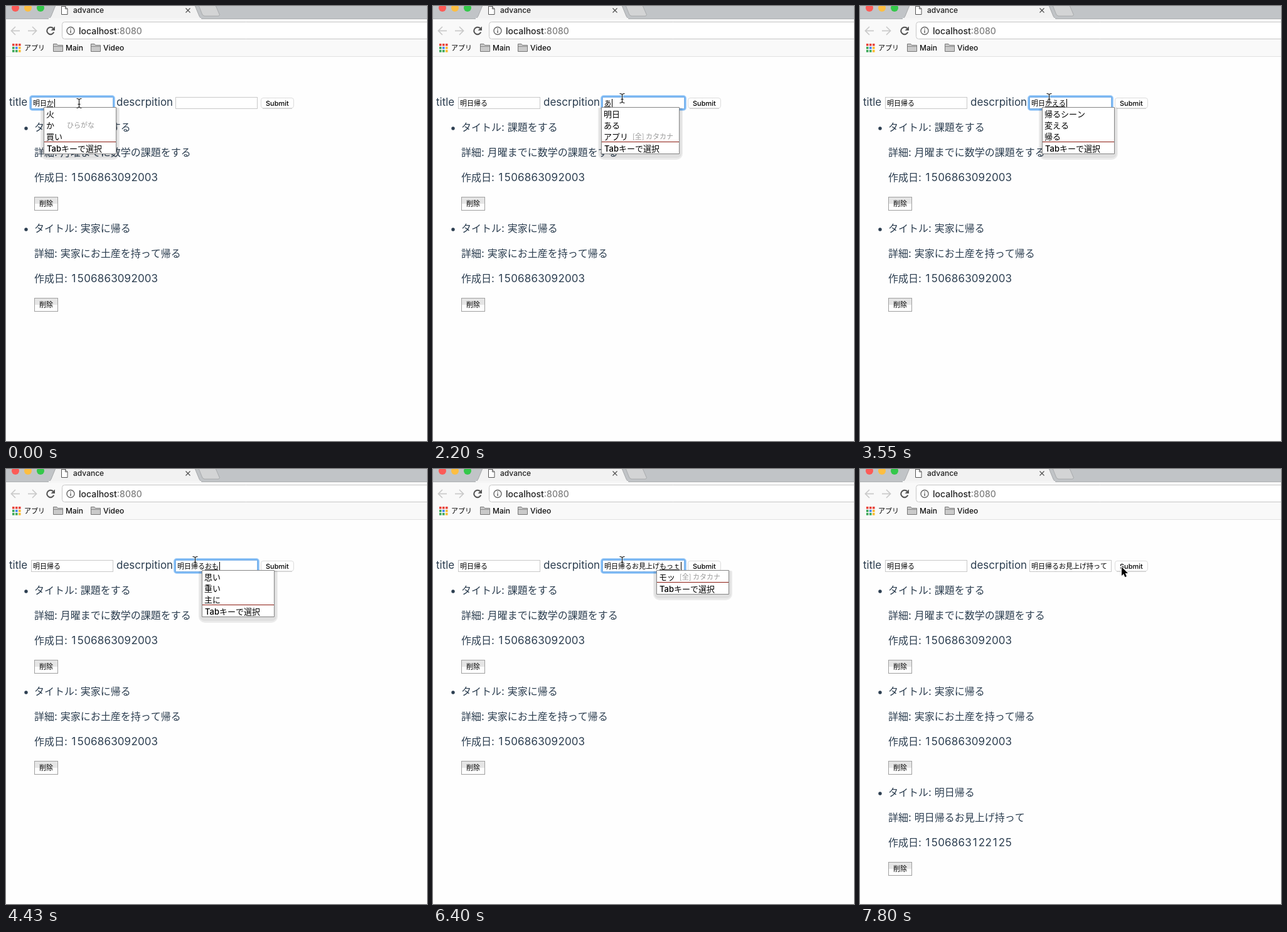
An HTML page with a canvas that plays this animation: 671x693 px, repeating every 8000 ms.

```html
<!DOCTYPE html>
<html lang="ja">
<head>
<meta charset="utf-8">
<title>advance</title>
<style>
  html, body { margin: 0; width: 100%; height: 100%; overflow: hidden; background: #fefefe; }
  canvas { display: block; }
</style>
</head>
<body>
<canvas id="stage" width="671" height="693"></canvas>
<script>
const ctx = document.getElementById('stage').getContext('2d');
const LOOP = 8000;
const LATIN = 'Inter, "Noto Sans CJK JP", "Noto Sans CJK", sans-serif';
const KANA = '"Noto Sans CJK JP", "Noto Sans CJK", Inter, sans-serif';
const INK = '#2c3e50';
const TITLE_X = 40, DESC_X = 270;

// Typing steps: start time, focused field, committed text, composing text, candidates
const KA = ['火', 'か|ひらがな', '買い'];
const KAE = ['変える', '帰る', 'かえ|ひらがな'];
const KAERU = ['帰るシーン', '変える', '帰る'];
const ASHI = ['明日', '足', 'アシスタント|[全] カタカナ'];
const O = ['お', '終わり', '多い'];
const GO_HOME = '明日帰る', GIFT = '明日帰るお見上げ', DONE = '明日帰るお見上げ持って';
const STEPS = [
  [0, 'title', '明日', 'か', KA],
  [180, 'title', '明日', 'かえ', KAE],
  [260, 'title', '明日', 'かえる', KAERU],
  [440, 'title', '明日', '帰る'],
  [860, 'title', GO_HOME],
  [1790, 'desc', ''],
  [2200, 'desc', '', 'あ', ['明日', 'ある', 'アプリ|[全] カタカナ']],
  [2280, 'desc', '', 'あｓ', ASHI],
  [2360, 'desc', '', 'あし', ASHI],
  [2440, 'desc', '', 'あしｔ', ASHI],
  [2530, 'desc', '', 'あした', ['明日', '明日の', 'あした|ひらがな']],
  [2610, 'desc', '', '明日'],
  [3080, 'desc', '明日', 'か', KA],
  [3260, 'desc', '明日', 'かえ', KAE],
  [3370, 'desc', '明日', 'かえｒ', KAE],
  [3550, 'desc', '明日', 'かえる', KAERU],
  [3960, 'desc', '明日', '帰る'],
  [4140, 'desc', GO_HOME, 'お', O],
  [4240, 'desc', GO_HOME, 'おｍ', O],
  [4430, 'desc', GO_HOME, 'おも', ['思い', '重い', '主に']],
  [5210, 'desc', GO_HOME, 'お', O],
  [5380, 'desc', GO_HOME, 'おｍ', O],
  [5440, 'desc', GO_HOME, 'おみ', ['お見']],
  [5620, 'desc', GO_HOME, 'おみあ', ['お見合い', 'お見上げ', 'おみあ']],
  [5800, 'desc', GO_HOME, 'おみあｇ', ['お見上げ']],
  [5900, 'desc', GO_HOME, 'おみあげ', ['お見上げ']],
  [6010, 'desc', GO_HOME, 'お見上げ'],
  [6110, 'desc', GIFT, 'も', ['もう', '持って', 'モニター|[全] カタカナ']],
  [6220, 'desc', GIFT, 'もっ', ['持って', 'もっと', 'モニター|[全] カタカナ']],
  [6400, 'desc', GIFT, 'もっｔ', ['モッ|[全] カタカナ']],
  [6520, 'desc', GIFT, 'もって', ['持って', 'もって', '以って']],
  [6630, 'desc', GIFT, '持って'],
  [6750, 'desc', DONE],
  [7740, '', DONE]
];

const ITEMS = [
  ['課題をする', '月曜までに数学の課題をする', '1506863092003'],
  ['実家に帰る', '実家にお土産を持って帰る', '1506863092003'],
  ['明日帰る', '明日帰るお見上げ持って', '1506863122125']
];

function text(str, x, y, size, color = '#000', family = KANA) {
  ctx.font = `${size < 16 ? 500 : 400} ${size}px ${family}`;
  ctx.fillStyle = color;
  ctx.fillText(str, x, y);
  return ctx.measureText(str).width;
}

// Every digit takes the width of a zero, so numbers line up
function figures(str, x, y, size, color) {
  ctx.font = `${size}px ${LATIN}`;
  ctx.fillStyle = color;
  const cell = ctx.measureText('0').width;
  [...str].forEach((digit, i) =>
    ctx.fillText(digit, x + i * cell + (cell - ctx.measureText(digit).width) / 2, y));
  return cell * str.length;
}

// Latin runs use a slightly larger face than the kana around them
function mixed(str, x, y) {
  for (const run of str.match(/\d+|[ -\/:-~]+|[^ -~]+/g)) {
    if (/\d/.test(run)) x += figures(run, x, y, 17, INK);
    else if (/[ -~]/.test(run)) x += text(run, x, y, 17, INK, LATIN);
    else x += text(run, x, y, 16, INK);
  }
}

function rect(x, y, w, h, fill) {
  ctx.fillStyle = fill;
  ctx.fillRect(x, y, w, h);
}

function box(x, y, w, h, r, fill, stroke, width = 1) {
  ctx.beginPath();
  ctx.roundRect(x, y, w, h, r);
  paint(fill, stroke, width);
}

function poly(points, fill, stroke, width = 1, closed = true) {
  ctx.beginPath();
  points.forEach(([x, y]) => ctx.lineTo(x, y));
  if (closed) ctx.closePath();
  paint(fill, stroke, width);
}

function disc(x, y, r, fill, stroke, width) {
  ctx.beginPath();
  ctx.arc(x, y, r, 0, Math.PI * 2);
  paint(fill, stroke, width);
}

function paint(fill, stroke, width = 1) {
  if (fill) { ctx.fillStyle = fill; ctx.fill(); }
  if (stroke) { ctx.strokeStyle = stroke; ctx.lineWidth = width; ctx.stroke(); }
}

function drawTabs() {
  rect(0, 0, 671, 20, '#c1c4c7');
  rect(0, 20, 671, 1, '#adb0b2');
  ['#fc5b57', '#fdbe41', '#34c84a'].forEach((c, i) => disc(15 + i * 20, 3, 6, c));
  ctx.beginPath();
  ctx.moveTo(67, 21);
  ctx.quadraticCurveTo(70, 20, 72, 16);
  ctx.lineTo(79, -1);
  ctx.lineTo(301, -1);
  ctx.lineTo(308, 16);
  ctx.quadraticCurveTo(310, 20, 313, 21);
  paint('#f2f2f2', '#a6a8aa');
  poly([[307, -1], [334, -1], [340.5, 14], [339, 16], [316, 16], [313, 14]], '#d3d4d5', '#a9abad');
  poly([[88.5, 0.5], [94.5, 0.5], [98, 4.5], [98, 13.5], [88.5, 13.5]], '#fff', '#555');
  poly([[94.5, 0.5], [94.5, 4.5], [98, 4.5]], null, '#555', 1, false);
  text('advance', 107, 11, 12, '#222', LATIN);
  poly([[286.5, 3.5], [293.5, 10.5]], null, '#555', 1.3, false);
  poly([[293.5, 3.5], [286.5, 10.5]], null, '#555', 1.3, false);
}

function drawToolbar() {
  rect(0, 21, 671, 59, '#f9f9f9');
  rect(68, 19, 243, 3, '#f5f5f5');
  rect(0, 80, 671, 1, '#e2e2e2');
  for (const [x, d] of [[15, 1], [42, -1]]) {
    poly([[x - 6 * d, 39.5], [x + 7 * d, 39.5]], null, '#c9c9c9', 1.7, false);
    poly([[x, 33], [x - 6.5 * d, 39.5], [x, 46]], null, '#c9c9c9', 1.7, false);
  }
  ctx.beginPath();
  ctx.arc(71, 39.5, 5.7, 0.4, Math.PI * 1.75);
  paint(null, '#555', 2);
  poly([[78, 32.5], [78, 39], [71.5, 39]], '#555');

  box(89.5, 25.5, 600, 27, 4, '#fff', '#c6c6c6');
  disc(103, 39.5, 6, null, '#666', 1.4);
  rect(102.3, 38.5, 1.5, 4.5, '#666');
  rect(102.3, 35.8, 1.5, 1.5, '#666');
  const w = text('localhost', 116, 44.5, 14, '#222', LATIN);
  text(':8080', 116 + w, 44.5, 14, '#808080', LATIN);

  const red = '#e8453c', green = '#3aa757', blue = '#4285f4', yellow = '#f9bb2d';
  [red, red, red, green, blue, yellow, green, green, yellow].forEach((c, i) =>
    rect(10 + i % 3 * 5, 60 + Math.floor(i / 3) * 5, 3.6, 3.6, c));
  text('アプリ', 29, 71, 11);
  for (const [x, name] of [[75, 'Main'], [135, 'Video']]) {
    poly([[x + .5, 60.5], [x + 6, 60.5], [x + 7.5, 62.5], [x + 15.5, 62.5], [x + 15.5, 72.5], [x + .5, 72.5]],
      '#cacaca', '#777');
    rect(x + 1, 64, 14, 1, '#8b8b8b');
    text(name, x + 20, 71, 12, '#111', LATIN);
  }
}

function drawItem([title, detail, created], top) {
  disc(32, top + 2, 2.7, INK);
  mixed('タイトル: ' + title, 45, top + 6);
  mixed('詳細: ' + detail, 45, top + 46);
  mixed('作成日: ' + created, 45, top + 86);
  rect(45, top + 111, 38, 22, '#a0a0a0');
  rect(46, top + 112, 36, 20, '#fdfdfd');
  rect(46, top + 112, 36, 10, '#e5e5e5');
  text('削除', 53, top + 126, 11);
}

function drawInput(x, value, focused) {
  if (focused) {
    box(x - 1, 144, 133, 21, 3, null, '#a8d0f8', 4);
    box(x - .5, 144.5, 132, 20, 2, null, '#6cb0f2', 2);
  }
  rect(x, 145, 131, 19, focused ? '#8ab9ea' : '#c9c9c9');
  rect(x + 1, 146, 129, 17, '#fff');
  text(value, x + 3, 159, 11);
}

function drawPopup(x, rows) {
  const pairs = rows.map(row => row.split('|'));
  const wordWidth = Math.max(...pairs.map(([word]) => word.length * 13));
  const hasNote = pairs.some(([, note]) => note);
  ctx.font = `11px ${KANA}`;
  const noteWidth = Math.max(...pairs.map(([, note]) => note ? ctx.measureText(note).width : 0));
  const w = Math.max(115, Math.round(5 + wordWidth + (hasNote ? 6 + noteWidth + 9 : 5)));
  const line = 162 + rows.length * 18;
  const h = line + 20 - 161;

  box(x - 5, 162, w + 11, h + 8, [2, 2, 10, 10], 'rgba(0,0,0,.075)');
  box(x - 3, 162, w + 7, h + 5, [2, 2, 7, 7], 'rgba(0,0,0,.05)');
  box(x + .5, 161.5, w, h - 1, 0, '#fff', '#858585');
  pairs.forEach(([word, note], i) => {
    const y = 177 + i * 18;
    text(word, x + 4, y, 13);
    if (note) text(note, x + 11 + wordWidth, y - 1, 11, '#999');
  });
  rect(x + 1, line, w - 1, 1, '#8b1a10');
  const tab = text('Tab', x + 5, line + 16, 13, '#000', LATIN);
  text('キーで選択', x + 5 + tab, line + 16, 13);
}

function drawBeam(x, y) {
  const shape = () => {
    ctx.beginPath();
    ctx.moveTo(x - 3.5, y - 7.5);
    ctx.quadraticCurveTo(x + .5, y - 7.5, x + .5, y - 5);
    ctx.quadraticCurveTo(x + .5, y - 7.5, x + 4.5, y - 7.5);
    ctx.moveTo(x + .5, y - 6);
    ctx.lineTo(x + .5, y + 6);
    ctx.moveTo(x - 3.5, y + 7.5);
    ctx.quadraticCurveTo(x + .5, y + 7.5, x + .5, y + 5);
    ctx.quadraticCurveTo(x + .5, y + 7.5, x + 4.5, y + 7.5);
    ctx.moveTo(x - 1.5, y + 1.5);
    ctx.lineTo(x + 2.5, y + 1.5);
  };
  shape();
  paint(null, 'rgba(255,255,255,.7)', 2.5);
  shape();
  paint(null, '#111', 1.1);
}

function drawArrow(x, y) {
  const tip = [[0, 0], [0, 14], [3.2, 11], [5.4, 16.2], [7.9, 15.1], [5.7, 10], [10, 10]];
  const points = tip.map(([dx, dy]) => [x + dx, y + dy]);
  poly(points, '#000', '#fff', 2);
  poly(points, '#000');
}

function glide(t, start, end, count, from, bend, to) {
  const step = Math.min(count, Math.floor((t - start) / (end - start) * (count - 1) + 1e-6) + 1);
  const p = step / count, u = p * p * (3 - 2 * p), v = 1 - u;
  return from.map((a, i) => v * v * a + 2 * v * u * bend[i] + u * u * to[i]);
}

function drawPointer(t) {
  const title = [116, 155], desc = [301, 147], submit = [417, 156];
  let [x, y] = title;
  if (t >= 6980) [x, y] = glide(t, 6980, 7560, 11, desc, [359, 94], submit);
  else if (t >= 1160) [x, y] = glide(t, 1160, 1560, 8, title, [208, 176], desc);
  const overText = t < 6980 || (y > 144 && x < 402);
  (overText ? drawBeam : drawArrow)(Math.round(x), Math.round(y));
}

function draw(t) {
  const [since, field, fixed, composing = '', rows] = STEPS.findLast(step => step[0] <= t);
  const value = fixed + composing;
  const inTitle = field === 'title';

  rect(0, 0, 671, 693, '#fefefe');
  drawTabs();
  drawToolbar();
  mixed('title', 5, 159);
  mixed('descrpition', 176, 159);
  drawInput(TITLE_X, inTitle ? value : GO_HOME, inTitle);
  drawInput(DESC_X, inTitle ? '' : value, field === 'desc');
  box(406.5, 146.5, 52, 16, 3.5, '#fff', '#dcdcdc');
  rect(409, 163, 47, 1, '#d2d2d2');
  text('Submit', 414, 159, 11, '#000', LATIN);
  ITEMS.slice(0, t >= 7800 ? 3 : 2).forEach((item, i) => drawItem(item, 193 + i * 161));

  if (field) {
    const left = (inTitle ? TITLE_X : DESC_X) + 3;
    const start = left + fixed.length * 11;
    if (composing) rect(start, 160, composing.length * 11 - 1, 1, '#222');
    if ((t - since) % 960 < 480) rect(left + value.length * 11 + 1, 148, 1, 13, '#000');
    if (rows) drawPopup(start - 5, rows);
  }
  drawPointer(t);
}

function tick() {
  draw(performance.now() % LOOP);
  requestAnimationFrame(tick);
}
tick();
</script>
</body>
</html>
```
